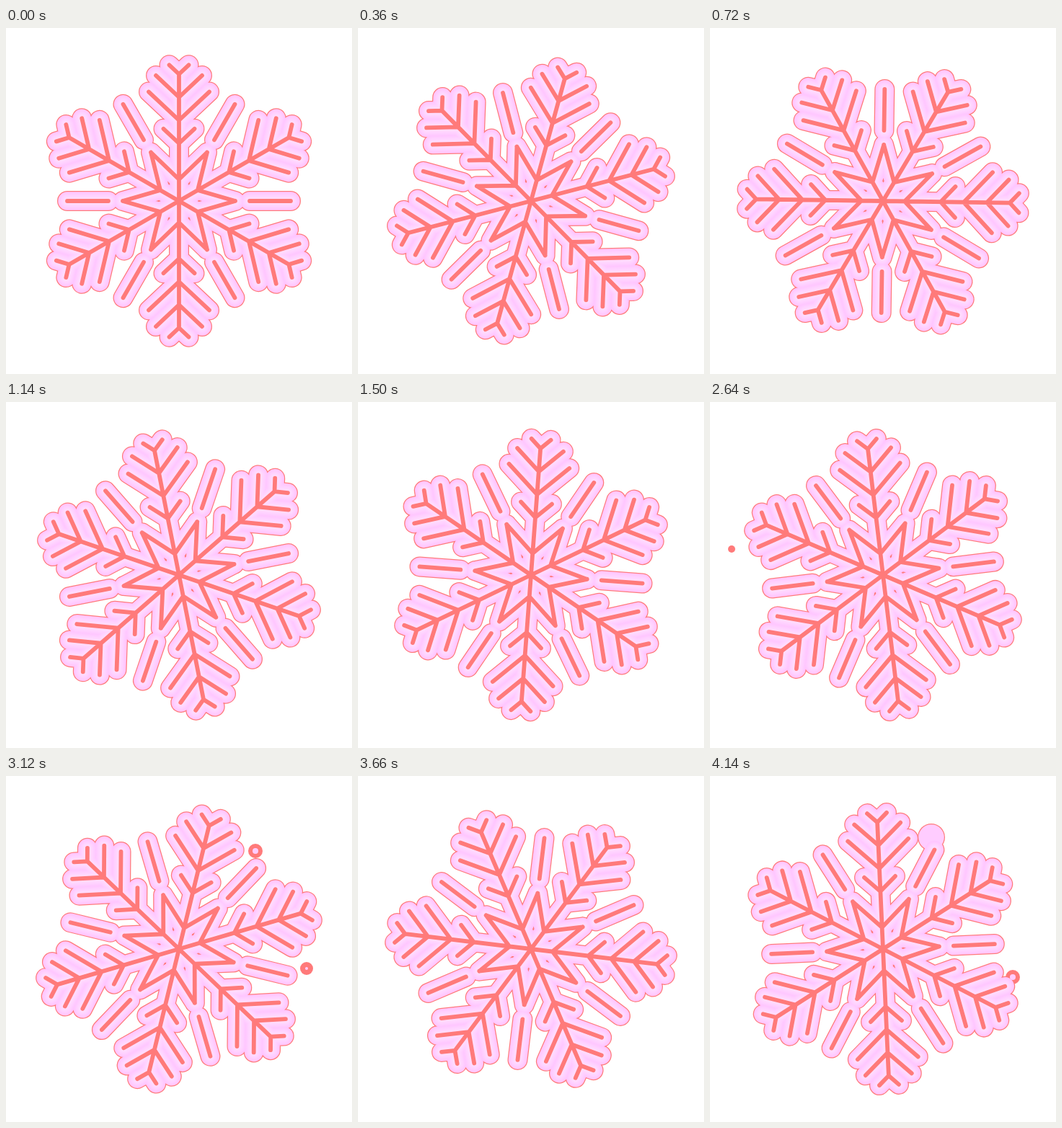
These frames come from a looping animation (480x480 px, 4200 ms). An HTML page:

```html
<!DOCTYPE html>
<html lang="en">
<head>
<meta charset="utf-8">
<title>Snowflake</title>
<style>
  html, body { margin: 0; width: 100%; height: 100%; overflow: hidden; background: #fff; }
  svg { display: block; width: 100vw; height: 100vh; }
  path { fill: none; stroke-linecap: round; stroke-linejoin: round; }
</style>
</head>
<body>
<svg id="stage" viewBox="0 0 480 480"></svg>
<script>
const LOOP = 4200, STEP = 60, CENTER = 240, CORAL = '#ff7a7a';
const stage = document.getElementById('stage');

function set(node, attrs) {
  for (const key in attrs) node.setAttribute(key, attrs[key]);
}

function add(name, attrs) {
  const node = document.createElementNS('http://www.w3.org/2000/svg', name);
  set(node, attrs);
  stage.appendChild(node);
  return node;
}

// One sixth of the flake repeats around the origin; chevrons sit evenly along each arm.
function flakePath() {
  const halfWidths = [13.5, 32, 42, 21.5];
  let d = '';
  const line = (angle, ...points) => {
    const c = Math.cos(angle), s = Math.sin(angle);
    d += 'M' + points.map(([x, r]) =>
      (x * c + r * s).toFixed(2) + ' ' + (x * s - r * c).toFixed(2)).join('L');
  };
  for (let i = 0; i < 6; i++) {
    const arm = i * Math.PI / 3;
    line(arm, [0, 0], [0, 177]);
    halfWidths.forEach((w, k) => {
      const joint = 176 - 32 * k, outer = joint + .94 * w;
      line(arm, [-w, outer], [0, joint], [w, outer]);
    });
    line(arm, [-39, 67.5], [0, 30], [39, 67.5]);
    line(arm + Math.PI / 6, [0, 98], [0, 155]);
  }
  return d;
}

// Sparks at their brightest: time, x, y, radius.
const sparks = [
  [2040, 131, 152, 11],
  [2040, 426, 270, 9],
  [2640, 30, 204, 5],
  [3120, 346, 104, 10],
  [3120, 417, 267, 9],
  [4140, 307, 85, 19],
  [4140, 420, 279, 10]
];
const SPARK_LIFE = 480, SPARK_DRIFT = .08;

const shape = flakePath();
const flake = (color, width) => add('path', { d: shape, stroke: color, 'stroke-width': width });
const dots = color => sparks.map(() => add('circle', { fill: color }));

const layers = [flake(CORAL, 28)];
const rims = dots(CORAL);
const cores = dots('#ffccff');

// The glow pales toward the strokes.
const BANDS = 6;
for (let i = 0; i < BANDS; i++) {
  const k = i / (BANDS - 1);
  layers.push(flake(`rgb(255 ${198 + 22 * k} 255)`, 25.5 - 16 * k));
}
layers.push(flake(CORAL, 5.8));

function drawSpark([peak, x, y, size], i, time) {
  const age = (time - peak) / SPARK_LIFE;
  const r = Math.abs(age) < .5 ? size * Math.sqrt(Math.cos(Math.PI * age)) : 0;
  const spread = 1 + SPARK_DRIFT * age;
  const place = { cx: CENTER + (x - CENTER) * spread, cy: CENTER + (y - CENTER) * spread };
  set(rims[i], { ...place, r });
  set(cores[i], { ...place, r: Math.max(0, Math.min(r - 1.2, 2 * r - 16)) });
}

function draw(time) {
  const transform = `translate(${CENTER} ${CENTER}) rotate(${180 * time / LOOP})`;
  layers.forEach(layer => set(layer, { transform }));
  sparks.forEach((spark, i) => drawSpark(spark, i, time));
}

const start = performance.now();
function tick() {
  const elapsed = (performance.now() - start) % LOOP;
  draw(Math.floor(elapsed / STEP) * STEP);
  requestAnimationFrame(tick);
}
tick();
</script>
</body>
</html>
```
